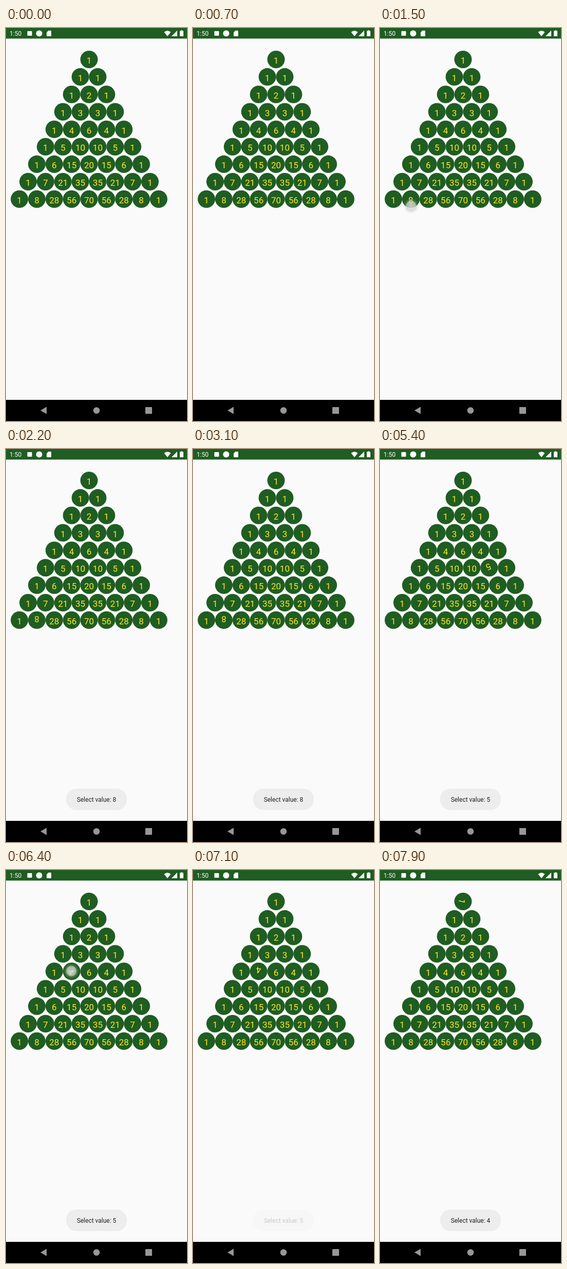
Recreate the animation shown at these times as an HTML page. Size 352 px wide and 762 px high, loop 8 s.

```html
<!DOCTYPE html>
<html lang="en">
<head>
<meta charset="utf-8">
<title>Number triangle</title>
<style>
  html, body { margin: 0; width: 100%; height: 100%; overflow: hidden; background: #fafafa; }
  svg { display: block; width: 352px; height: 762px; font-family: Roboto, Arial, sans-serif; }
  .cell { font-size: 17px; fill: #fdec1e; text-anchor: middle; }
</style>
</head>
<body>
<svg viewBox="0 0 352 762">
  <defs>
    <radialGradient id="glow">
      <stop offset="0" stop-color="#e4e6e4" stop-opacity=".82"/>
      <stop offset=".6" stop-color="#d2d6d2" stop-opacity=".76"/>
      <stop offset=".72" stop-color="#b4bab4" stop-opacity=".3"/>
      <stop offset="1" stop-color="#b4bab4" stop-opacity="0"/>
    </radialGradient>
  </defs>
  <rect width="352" height="762" fill="#fafafa"/>

  <!-- status bar -->
  <rect width="352" height="20.5" fill="#1f5d22"/>
  <g fill="#fff">
    <text x="7" y="15" font-size="12">1:50</text>
    <rect x="41.5" y="6" width="9" height="9" rx="1"/>
    <circle cx="64.5" cy="10.5" r="6"/>
    <path d="M82.5 5H87q1 0 1 1v9q0 1-1 1h-7q-1 0-1-1V8.500z"/>
    <path d="M307.500 8Q314 2.500 320.500 8L314 16z"/>
    <path d="M333 5V16H322z" opacity=".4"/>
    <path d="M329.500 8.500V16H322z"/>
    <path d="M333 5V16H329.500V8.500z"/>
    <path d="M340 5.500V4.500h3v1h2V16h-7V5.500z"/>
  </g>

  <g id="cells"></g>
  <circle id="dot" r="15" fill="url(#glow)" opacity="0"/>
  <g id="toast" opacity="0">
    <rect x="117" y="658.500" width="118" height="41.500" rx="20" fill="#ededed"/>
    <text x="176" y="684" font-size="12" fill="#222" text-anchor="middle"></text>
  </g>

  <!-- navigation bar -->
  <rect y="721" width="352" height="41" fill="#000"/>
  <g fill="#979797">
    <path d="M67 741.500 79 734.500V748.500z"/>
    <circle cx="176" cy="741.500" r="6.300"/>
    <rect x="271" y="735" width="13" height="13" rx=".6"/>
  </g>
</svg>
<script>
  const LOOP = 8000, TURN = 700, ROWS = 9, STEP = 33.85;

  // lead: how far into its turn the number already is when the tap shows
  const taps = [
    { at: 1500, row: 8, col: 1, x: 60.5, y: 345, lead: 0 },
    { at: 4800, row: 5, col: 4, x: 229, y: 230, lead: 0 },
    { at: 6400, row: 4, col: 1, x: 127, y: 196, lead: 175 },
    { at: 7500, row: 0, col: 0, x: 161, y: 62, lead: 0 }
  ];
  const toasts = [
    { value: 8, from: 1700, to: 3620 },
    { value: 5, from: 5000, to: 6750 },
    { value: 4, from: 7200, to: LOOP }
  ];

  const cells = document.getElementById('cells');
  const dot = document.getElementById('dot');
  const toast = document.getElementById('toast');
  const message = toast.querySelector('text');
  const clamp = v => Math.max(0, Math.min(1, v));

  function add(tag, attrs) {
    const el = document.createElementNS('http://www.w3.org/2000/svg', tag);
    for (const k in attrs) el.setAttribute(k, attrs[k]);
    return cells.appendChild(el);
  }

  const grid = [];
  for (let row = 0; row < ROWS; row++) {
    let value = 1;
    grid.push([]);
    for (let col = 0; col <= row; col++) {
      const x = 161.5 + (col - row / 2) * STEP, y = 61 + row * STEP;
      add('circle', { cx: x, cy: y, r: 17, fill: '#1f5d22' });
      const label = add('text', { class: 'cell', x, y: y + 8.2 });
      label.textContent = value;
      grid[row].push({ label, x, y });
      value = value * (row - col) / (col + 1);
    }
  }

  function draw(t) {
    const active = taps.filter(p => p.at <= t).pop();
    for (const p of taps) {
      const { label, x, y } = grid[p.row][p.col];
      const angle = p === active ? 180 * clamp((t - p.at + p.lead) / TURN) : 0;
      label.setAttribute('transform', `rotate(${angle} ${x} ${y})`);
    }

    const age = active ? t - active.at : LOOP;
    dot.setAttribute('opacity', 1 - clamp((age - 120) / 150));
    if (active) {
      dot.setAttribute('cx', active.x);
      dot.setAttribute('cy', active.y);
    }

    const note = toasts.filter(n => n.from <= t).pop();
    if (note) message.textContent = 'Select value: ' + note.value;
    const shown = note ? clamp((t - note.from) / 200) * (1 - clamp((t - note.to) / 450)) : 0;
    toast.setAttribute('opacity', shown);
  }

  const start = performance.now();
  function tick() {
    draw((performance.now() - start) % LOOP);
    requestAnimationFrame(tick);
  }
  tick();
</script>
</body>
</html>
```
